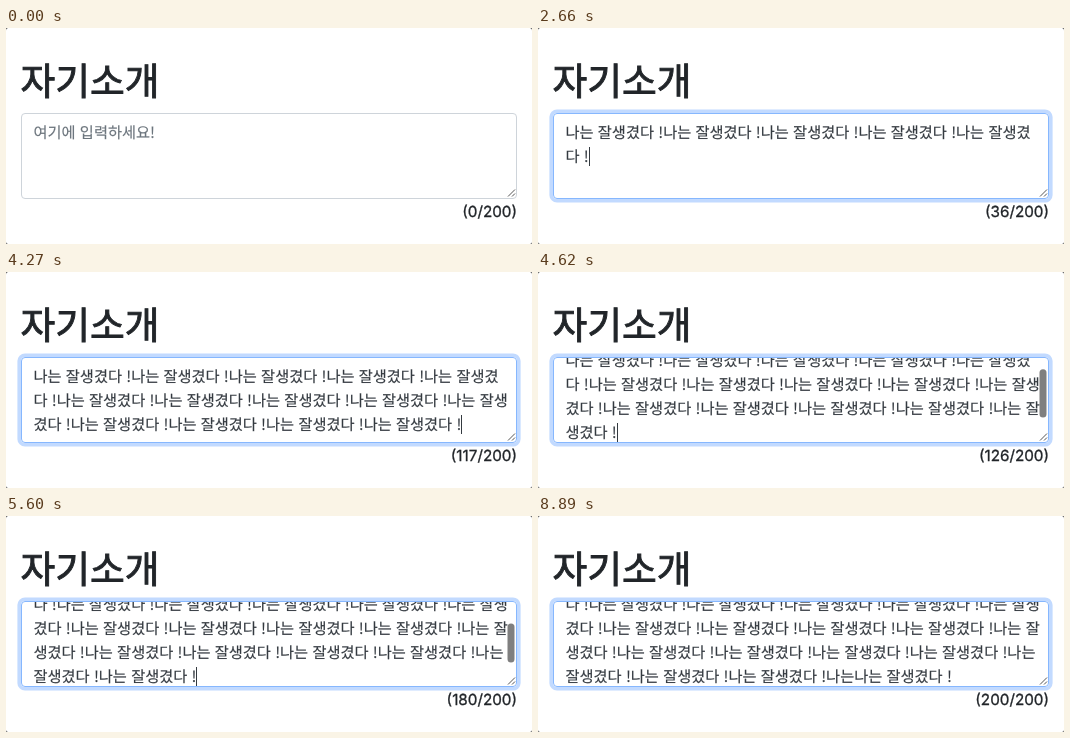
An HTML page that plays this animation: 526x216 px, repeating every 9.24 s.

```html
<!DOCTYPE html>
<html lang="ko">
<head>
<meta charset="utf-8">
<title>자기소개</title>
<style>
  html, body { margin: 0; width: 100%; height: 100%; overflow: hidden; background: #555; }
  svg { display: block; width: 526px; height: 216px; }
  text {
    font-family: "Noto Sans CJK KR", "Noto Sans CJK", sans-serif; font-size: 15.25px;
    fill: #343a40; stroke: #343a40; stroke-width: 0.15px; text-rendering: geometricPrecision;
  }
  #title { font-size: 37.8px; font-weight: 500; fill: #212529; stroke: #212529; stroke-width: 0.9px; }
  #hint { fill: #6c757d; stroke: #6c757d; }
  #count { font-family: Inter, sans-serif; fill: #212529; stroke: #212529; stroke-width: 0.3px; text-anchor: end; }
</style>
</head>
<body>
<svg viewBox="0 0 526 216">
  <clipPath id="inner"><rect x="16" y="86" width="494" height="84"/></clipPath>
  <rect width="526" height="216" rx="2.5" fill="#fff"/>
  <text id="title" x="14.5" y="67">자기소개</text>
  <rect id="ring" fill="#0d6efd"/>
  <rect x="15" y="85" width="496" height="86" rx="4" fill="#fff"/>
  <rect id="border" x="15.5" y="85.5" width="495" height="85" rx="3.5" fill="none"/>
  <g clip-path="url(#inner)">
    <text id="hint" x="27.5" y="110">여기에 입력하세요!</text>
    <g id="body"></g>
    <rect id="caret" width="1" height="19" fill="#343a40"/>
  </g>
  <rect id="thumb" x="501.5" width="7" rx="3.5"/>
  <path d="M502 168.5L509 161.5M506 168.5L509 165.5" stroke="#555" fill="none"/>
  <text id="count" x="511" y="189"></text>
</svg>
<script>
const LOOP = 9240, TICK = 70, LIMIT = 200;
const PHRASE = '나는 잘생겼다 !';
const PASTES = [1540, 1820, 2170, 2450, 2660, 2800, 3010, 3150, 3360, 3570, 3710, 3920,
  4060, 4270, 4480, 4690, 4830, 5040, 5180, 5390, 5600, 5810, 6020, 6230];
const BREAKS = [0, 42, 86, 130, 174, 300];
const FOCUS = 770, LEFT = 27.5, LINE = 24;
const CARET_OFF = [[0, FOCUS], [1260, 1540], [7840, 8400], [8890, LOOP]];
const SCROLLS = [{ at: 4480, top: 16 }, { at: 5390, top: 40 }];

const $ = id => document.getElementById(id);
const clamp = v => Math.max(0, Math.min(1, v));
const set = (id, attrs) => {
  for (const k in attrs) $(id).setAttribute(k, attrs[k]);
};

const rows = BREAKS.slice(1).map((_, i) => {
  const row = document.createElementNS('http://www.w3.org/2000/svg', 'text');
  row.setAttribute('x', LEFT);
  row.setAttribute('y', 110 + i * LINE);
  return $('body').appendChild(row);
});

// The counter and the length limit apply just before each paste.
function typed(t) {
  let value = '', count = 0;
  for (const at of PASTES) {
    if (t < at) break;
    value = value.slice(0, LIMIT);
    count = value.length;
    value += PHRASE;
  }
  return { value, count };
}

function drawFocus(t) {
  const k = clamp((t - FOCUS + TICK) / (3 * TICK));
  const s = 3.6 * k;
  const mix = (a, b) => Math.round(a + (b - a) * k);
  set('ring', { x: 15 - s, y: 85 - s, width: 496 + 2 * s, height: 86 + 2 * s, rx: 4 + s, opacity: 0.25 * k });
  set('border', { stroke: `rgb(${mix(206, 134)},${mix(212, 183)},${mix(218, 254)})` });
}

function drawThumb(t, scroll) {
  if (!scroll) return set('thumb', { opacity: 0 });
  const track = 66, view = 84, inset = 1.5, content = view + scroll.top + 8;
  set('thumb', {
    y: 86 + inset + track * scroll.top / content,
    height: track * view / content - 2 * inset,
    opacity: 0.5 * clamp((720 - (t - scroll.at)) / 190)
  });
}

function draw(t) {
  const { value, count } = typed(t);
  const scroll = SCROLLS.filter(s => t >= s.at).pop();
  const top = scroll ? scroll.top : 0;

  drawFocus(t);
  rows.forEach((row, i) => { row.textContent = value.slice(BREAKS[i], BREAKS[i + 1]); });
  set('body', { transform: `translate(0 ${-top})` });
  set('hint', { opacity: value ? 0 : 1 });
  $('count').textContent = `(${count}/${LIMIT})`;

  const last = Math.max(0, rows.filter(r => r.textContent).length - 1);
  const width = value ? rows[last].getComputedTextLength() : 0;
  const hidden = CARET_OFF.some(([a, b]) => t >= a && t < b);
  set('caret', { x: Math.round(LEFT + width), y: 95 + last * LINE - top, opacity: hidden ? 0 : 1 });
  drawThumb(t, scroll);
}

let start, shown = -1;
function loop(now) {
  start ??= now;
  const t = Math.floor((now - start) % LOOP / TICK) * TICK;
  if (t !== shown) draw(shown = t);
  requestAnimationFrame(loop);
}
draw(0);
requestAnimationFrame(loop);
</script>
</body>
</html>
```
